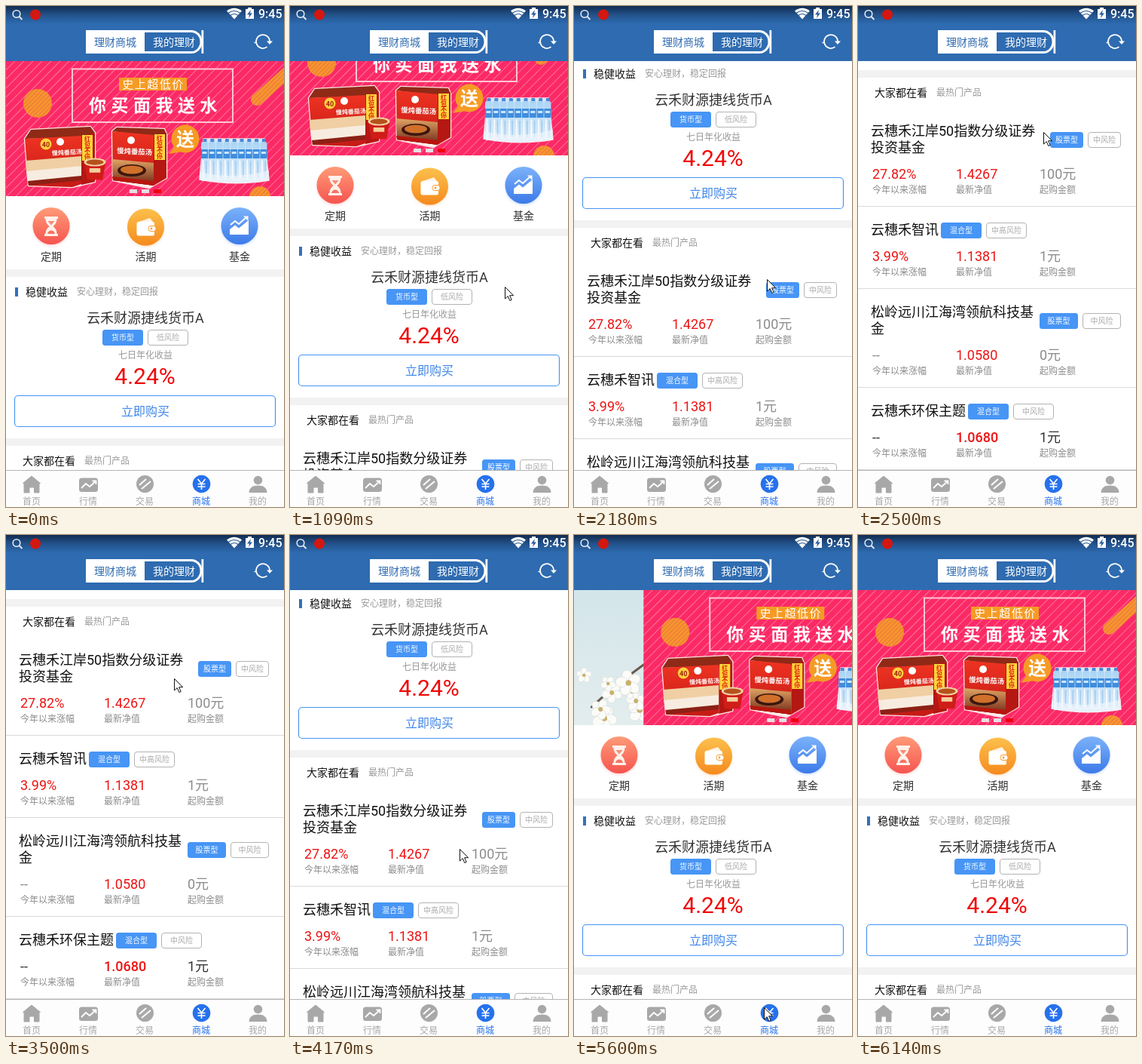
An HTML page that plays this animation: 369 by 664 pixels, repeating every 7.67 s.

```html
<!DOCTYPE html>
<html lang="zh-CN">
<head>
<meta charset="utf-8">
<title>理财商城</title>
<style>
html, body { margin: 0; width: 100%; height: 100%; overflow: hidden; background: #fff; }
svg { display: block; width: 100%; height: 100%; }
text { font-family: Roboto, "Noto Sans CJK SC", "Noto Sans CJK", sans-serif; white-space: pre; }
</style>
</head>
<body>
<svg id="stage" viewBox="0 0 369 664"></svg>
<script>
const LOOP = 7670, FIRST = 174, STEP = 110.2;
const BLUE = '#4795f5', RED = '#ee1414', GREY = '#8c8c8c', NAV = '#a8a8a8';

// drawing helpers
const text = (x, y, s, size, fill, extra = '') =>
  `<text x="${x}" y="${y}" font-size="${size}" fill="${fill}" ${extra}>${s}</text>`;
const mid = (x, y, s, size, fill, extra = '') => text(x, y, s, size, fill, 'text-anchor="middle" ' + extra);
const rect = (x, y, w, h, fill, extra = '') =>
  `<rect x="${x}" y="${y}" width="${w}" height="${h}" fill="${fill}" ${extra}/>`;
const circle = (x, y, r, fill, extra = '') => `<circle cx="${x}" cy="${y}" r="${r}" fill="${fill}" ${extra}/>`;
const path = (d, fill, extra = '') => `<path d="${d}" fill="${fill}" ${extra}/>`;
const line = (d, color, w, extra = '') => path(d, 'none', `stroke="${color}" stroke-width="${w}" ${extra}`);
const group = (attrs, s) => `<g ${attrs}>${s}</g>`;
const repeat = (n, f) => Array.from({ length: n }, (_, i) => f(i)).join('');
const grad = (id, a, b) => `<linearGradient id="${id}" x2="0" y2="1"><stop stop-color="${a}"/>
  <stop offset="1" stop-color="${b}"/></linearGradient>`;

const defs = `<defs>
  ${grad('coral', '#ff9b78', '#f5544f')}${grad('amber', '#fcc04c', '#f58a1e')}${grad('azure', '#7cb2fa', '#3c7ae8')}
  ${grad('carton', '#ee3322', '#c41a15')}${grad('food', '#e0a565', '#6d2413')}
  ${grad('water', '#a9d4f5', '#e2effa')}${grad('sky', '#d3e5ea', '#e3edee')}
  <linearGradient id="status" x2="0" y2="1"><stop stop-color="#122c50"/><stop offset=".5" stop-color="#23538c"/>
    <stop offset="1" stop-color="#2e6bb0"/></linearGradient>
  <pattern id="rain" width="8.5" height="8.5" patternUnits="userSpaceOnUse" patternTransform="rotate(45)">
    ${rect(0, 0, 9, 9, '#fb2a66')}${rect(0, 0, .9, 9, '#ff7a9c')}</pattern>
  <pattern id="peel" width="4" height="4" patternUnits="userSpaceOnUse" patternTransform="rotate(45)">
    ${rect(0, 0, 4, 4, '#f6982c')}${rect(0, 0, 1.2, 4, '#ee7440')}</pattern>
  <clipPath id="view">${rect(0, 73, 369, 542, '#000')}</clipPath>
  <clipPath id="frame">${rect(0, 73, 369, 179, '#000')}</clipPath>
  <filter id="soft" x="-30%" y="-30%" width="160%" height="160%"><feGaussianBlur stdDeviation="2"/></filter>
</defs>`;

function noodleBoxes() {
  const glow = 'stroke="#ffe3e3" stroke-width="2.5" stroke-linejoin="round"';
  const bowl = (x, y, w) =>
    path(`M${x - w} ${y}L${x - w * .7} ${y + w * 1.6}H${x + w * .7}L${x + w} ${y}Z`, '#cf1d18') +
    `<ellipse cx="${x}" cy="${y}" rx="${w}" ry="${w * .38}" fill="#f3d3a4"/>
     <ellipse cx="${x}" cy="${y}" rx="${w * .8}" ry="${w * .25}" fill="#b5521d"/>` +
    rect(x - w * .5, y + w * .55, w, w * .4, '#f5cf9c');
  const strip = (x, y) => rect(x, y, 14, 34, '#ffd53a') +
    repeat(4, i => mid(x + 7, y + 8 + i * 8, '红包不停'[i], 8, '#d21', 'font-weight="700"'));
  const big = path('M25 176L33 164L112 160L118 168V233L88 240L30 238Z', '#fff', glow) +
    path('M25 176L33 164L112 160L118 168L100 174Z', '#8f2a17') +
    path('M25 176L100 172V236L88 240L30 238Z', 'url(#carton)') +
    path('M26 205L100 199V213L27 220Z', '#f0cfa4') + path('M27 219L100 212V226L29 233Z', '#f7ece0') +
    path('M29 232L100 225V231L30 238Z', '#8d2015') +
    path('M100 172L118 168V233L100 237Z', '#b51713') + strip(101, 171) +
    circle(53, 183, 7.5, '#ffd23c') + mid(53, 186.5, '40', 9, '#a32212', 'font-weight="700"') +
    circle(72, 180, 5, '#fff') +
    text(61, 198, '慢炖番茄汤', 8, '#fff', 'font-weight="700" transform="rotate(-3 61 198)"') + bowl(118, 207, 14.5);
  const small = path('M141 166L147 161L210 163L213 170V228L190 241L142 231Z', '#fff', glow) +
    path('M141 166L147 161L210 163L213 170L196 173Z', '#8f2a17') +
    path('M141 166L196 171V238L142 231Z', 'url(#carton)') +
    path('M196 171L213 168V228L196 238Z', '#b51713') + strip(197, 170) +
    circle(166, 178, 5, '#fff') +
    text(147, 195, '慢炖番茄汤', 9.4, '#fff', 'font-weight="700" transform="rotate(3 147 195)"') +
    path('M141 203L196 208V238L142 231Z', 'url(#food)') +
    `<ellipse cx="167" cy="218" rx="19" ry="8" fill="#3a1710"/><ellipse cx="167" cy="217" rx="15" ry="5.5" fill="#d0702a"/>` +
    path('M141 226L196 232V238L142 231Z', '#b8160f');
  return big + small;
}

function waterPack() {
  const bottle = i => {
    const x = 259 + i * 9.8;
    return rect(x + 2.5, 176, 5, 5, '#4a86d6', 'rx="1"') + rect(x, 180, 9, 52, 'url(#water)', 'rx="3"') +
      rect(x, 190, 9, 12, '#3f8ddd') + rect(x + 1.5, 193, 6, 3, '#cde6fb') +
      rect(x + 1.5, 204, 2, 26, '#fff', 'opacity=".8"') + rect(x + 6, 206, 1.5, 22, '#8fbfe9', 'opacity=".7"');
  };
  return path('M262 176H343L349 231Q303 239 257 230Z', '#d5e7f6', 'stroke="#ffe0e8" stroke-width="1.5"') +
    repeat(9, bottle) + path('M257 220Q303 231 349 218V231Q303 239 257 230Z', '#eef5fc', 'opacity=".7"');
}

const pinkBanner = () => rect(0, 73, 369, 179, 'url(#rain)') +
  circle(42, 129, 19, 'url(#peel)') + circle(337, 253, 14, 'url(#peel)') +
  line('M333 124L376 86', 'url(#peel)', 16, 'stroke-linecap="round"') +
  rect(88, 83.5, 213, 70.5, 'none', 'stroke="#ffc4d5" stroke-width="2"') +
  rect(150, 95, 90, 17, '#f59b25') +
  mid(195.5, 109, '史上超低价', 15, '#fff', 'font-weight="500" letter-spacing="1.5"') +
  text(110, 140, '你买面我送水', 23, '#fff', 'font-weight="700" letter-spacing="6.5"') +
  noodleBoxes() + waterPack() +
  path('M224 186L216 196L234 193Z', '#f59b25') + circle(238, 176, 18.5, '#f59b25') +
  mid(238, 185, '送', 24, '#fff', 'font-weight="700"') +
  repeat(3, i => rect(164 + i * 16, 243, 10, 5, i == 2 ? '#f00010' : '#e6dde2'));

function blossomBanner() {
  const blossom = (x, y, r) => group(`transform="translate(${x} ${y})"`,
    repeat(5, i => `<ellipse cy="${-r * .6}" rx="${r * .45}" ry="${r * .55}" fill="#fbfbf8" stroke="#d5dcda"
      stroke-width=".6" transform="rotate(${i * 72 + x})"/>`) + circle(0, 0, r * .25, '#c9b06c'));
  const twig = (d, w) => line(d, '#6b5a4c', w, 'stroke-linecap="round"');
  const wave = i => line(`M66 ${209 + i * 5}q4.7 -6 9.4 0t9.4 0t9.4 0t9.4 0t9.4 0t9.4 0`, '#8cc068', 1.4);
  return rect(0, 73, 369, 179, 'url(#sky)') +
    twig('M369 172Q330 200 300 228', 3) + twig('M345 190Q348 215 369 236', 2) + twig('M0 236Q18 226 36 246', 2) +
    line('M117 208V223H216V100', '#fff', 4) +
    mid(185, 194, '众享·美惠', 35, '#1d2420', 'font-weight="700"') + repeat(3, wave) +
    repeat(9, i => blossom(290 + (i * 37) % 79, 186 + (i * 23) % 58, 9 + i % 3 * 3)) +
    repeat(4, i => blossom(3 + i * 11, 236 + (i * 7) % 12, 8 + i % 2 * 3));
}

function shortcuts() {
  const badge = (x, y, fill, glow, label, glyph) =>
    circle(x, y + 2, 23.5, glow, 'opacity=".35" filter="url(#soft)"') +
    circle(x, y, 24.5, `url(#${fill})`) + glyph + mid(x, 337, label, 14, '#333');
  return badge(60, 291.5, 'coral', '#f5544f', '定期',
      path('M51 279H69V282H67.5Q67.5 288 62.5 292Q67.5 296 67.5 302H69V305H51V302H52.5Q52.5 296 57.5 292Q52.5 288 52.5 282H51Z', '#fff1ea') +
      path('M55.5 285H64.5L60 290.5Z', '#f98c76') + path('M55 302Q56 297.5 60 297.5T65 302Z', '#f77264')) +
    badge(185.5, 293, 'amber', '#f58a1e', '活期',
      path('M176 286L191 281L195 286Z', '#fff', 'opacity=".85"') +
      rect(173.5, 286, 23.5, 18.5, '#fff', 'rx="2.5"') + rect(189, 291.5, 10, 7, '#fff', 'rx="3" stroke="#f79c2c"') +
      circle(193, 295, 1.4, '#f79c2c')) +
    badge(310, 291.5, 'azure', '#3c7ae8', '基金',
      path('M297 303V296L304 290.5L309 294.5L322 284V303Z', '#fff') +
      line('M298 290L304 285L309 289L319 280', '#fff', 2) + path('M315 278.5H321.5V285Z', '#fff'));
}

const pill = (x, y, w, s) => rect(x, y, w, 21, BLUE, 'rx="3.5"') +
  mid(x + w / 2, y + 14.2, s, 10, '#fff', 'font-weight="500"');
const ghost = (x, y, w, s) => rect(x + .5, y + .5, w - 1, 20, '#fff', 'rx="3.5" stroke="#b3b3b3"') +
  mid(x + w / 2, y + 14.2, s, 10, '#aaa');
const gap = y => rect(0, y, 369, 10, '#f2f2f2');

const offer = () => rect(12, 373, 4, 12, '#3470bb') + text(26, 384, '稳健收益', 14, '#111') +
  text(94, 383, '安心理财，稳定回报', 12, '#999') +
  mid(185, 420, '云禾财源捷线货币A', 18, '#333') +
  pill(128, 429, 54, '货币型') + ghost(188, 429, 54, '低风险') +
  mid(185, 467, '七日年化收益', 12, '#999') + mid(184.5, 501, '4.24%', 30, '#f00808') +
  rect(11.5, 516.5, 346, 41, '#fff', `rx="4.5" stroke="${BLUE}" stroke-width="1.2"`) +
  mid(185, 543, '立即购买', 16, '#3f86e8');

const funds = [
  { name: ['云穗禾江岸50指数分级证券', '投资基金'], type: '股票型', risk: '中风险', tag: [255, 44, 305, 44], vals: ['27.82%', '1.4267', '100元'] },
  { name: ['云穗禾智讯'], type: '混合型', risk: '中高风险', tag: [110, 54, 170, 54], vals: ['3.99%', '1.1381', '1元'] },
  { name: ['松岭远川江海湾领航科技基', '金'], type: '股票型', risk: '中风险', tag: [241, 51, 298, 51], vals: ['--', '1.0580', '0元'] },
  { name: ['云穗禾环保主题'], type: '混合型', risk: '中风险', tag: [146, 54, 206, 54], vals: ['--', '1.0680', '1元'], dark: true }
];
const labels = ['今年以来涨幅', '最新净值', '起购金额'];

function fundList() {
  let top = 622;
  return funds.map(f => {
    const extra = (f.name.length - 1) * 22, tagY = top + 22 + extra / 2, [a, aw, b, bw] = f.tag;
    const plain = f.dark ? '#333' : GREY;
    const cells = f.vals.map((v, i) => {
      const x = 19 + i * 111, red = i < 2 && v != '--';
      return text(x, top + 73 + extra, v, 18, red ? RED : plain, f.dark && red ? 'font-weight="500"' : '') +
        text(x, top + 92 + extra, labels[i], 12, GREY);
    }).join('');
    const row = f.name.map((s, i) => text(17, top + 38 + i * 22, s, 18, '#111')).join('') +
      pill(a, tagY, aw, f.type) + ghost(b, tagY, bw, f.risk) + cells;
    top += 109 + extra;
    return row + rect(0, top, 369, 1, '#d9d9d9');
  }).join('');
}

const page = () => group('clip-path="url(#frame)"',
    group('id="blossom"', blossomBanner()) + group('id="pink"', pinkBanner())) +
  shortcuts() + gap(349) + offer() + gap(573) +
  text(22, 608, '大家都在看', 14, '#111') + text(104, 607, '最热门产品', 12, '#999') + fundList();

const header = () => rect(0, 0, 369, 73, '#2e6bb0') + rect(0, 0, 369, 24, 'url(#status)') +
  circle(14, 10.5, 4.8, 'none', 'stroke="#e4ebf3" stroke-width="1.6"') + line('M17.5 14L21.5 18', '#e4ebf3', 1.8) +
  circle(39, 11.5, 7, '#d4170f') +
  path('M293 6.5Q303 -1 313 6.5L303 17.5Z', '#fff') +
  line('M295 9.5Q303 3.5 311 9.5M298 12.5Q303 8.5 308 12.5', '#28598f', 1.1) +
  path('M318 4H321V2H326V4H329V17H318Z', '#fff') + path('M325 5L320 11.5H323L322 16L327 9.5H324Z', '#2a5f9e') +
  text(335, 16, '9:45', 16, '#fff', 'font-weight="500"') +
  rect(106, 32, 78, 31, '#fff') + mid(145, 52.5, '理财商城', 14, '#2e6bb0') +
  line('M184 33.5H246A13 14 0 0 1 246 61.5H184', '#fff', 3) + rect(259.5, 32, 2.7, 31, '#fff') +
  mid(223, 52.5, '我的理财', 14, '#fff', 'font-weight="500"') +
  line('M346.5 54.2A9 9 0 1 1 350 47', '#fff', 1.7) +
  path('M346 46.5H354L350 51Z', '#fff') + line('M329.5 48.5H333', '#fff', 1.5);

function navBar() {
  const icons = path('M34 623L45.5 632.5H44V645H37.5V638H31V645H24V632.5H22.5Z', NAV, `stroke="${NAV}" stroke-linejoin="round"`) +
    rect(97, 625.5, 25, 18.5, NAV, 'rx="3.5"') +
    line('M100 639L106 633L111 637L119 630M114.5 629.5H119.5V634', '#fff', 1.8) +
    circle(184.5, 633.5, 11.5, NAV) + line('M177 635L186 627M180 640L192 630', '#fff', 2) +
    circle(259.5, 633.5, 11.8, '#2671ec') +
    line('M254.5 627L259.5 633L264.5 627M259.5 633V641M254.5 633.5H264.5M254.5 637H264.5', '#fff', 1.6) +
    circle(334.5, 628.5, 5.8, NAV) + path('M322.5 645Q323 635.5 334.5 635.5T346.5 645Z', NAV);
  return rect(0, 615, 369, 49, '#fdfdfd') + rect(0, 615, 369, 1, '#b5b5b5') + icons +
    ['首页', '行情', '交易', '商城', '我的'].map((s, i) => mid(34 + i * 75, 661, s, 12, i == 3 ? '#2671ec' : NAV)).join('');
}

const stage = document.getElementById('stage');
stage.innerHTML = defs + rect(0, 0, 369, 664, '#fff') +
  group('clip-path="url(#view)"', group('id="page"', page())) + header() + navBar() +
  group('id="cursor"', path('M.5 .5V16L4.2 12.6L6.8 18.5L9.2 17.4L6.6 11.7H11.6Z', '#fff', 'stroke="#111" stroke-width="1"'));
const [pageEl, pinkEl, blossomEl, cursorEl] =
  ['page', 'pink', 'blossom', 'cursor'].map(id => document.getElementById(id));

// step, pointer x, pointer y, scroll
const keys = [
  [0, 280, 517, 0], [6, 286, 433, 0], [7, 286, 405, 18], [8, 285, 372, 54], [10, 280, 275, 150],
  [11, 277, 280, 156], [13, 269, 377, 156], [15, 262, 492, 156], [16, 262, 492, 156], [21, 246, 167, 488],
  [22, 247, 215, 488], [24, 245, 463, 488], [25, 240, 486, 488], [26, 240, 486, 488], [30, 223, 190, 488],
  [32, 223, 190, 488], [33, 223, 232, 470], [36, 225, 416, 288], [39, 232, 589, 115], [40, 234, 597, 115],
  [44, 245, 336, 115], [45, 245, 350, 105], [47, 250, 611, 0], [54, 256, 665, 0]
];
const SWAP = 15, RETURN = 48, LAST = 54, WIDTH = 369;

function pose(k) {
  if (k <= 0) return keys[0];
  const i = keys.findIndex(p => p[0] >= k);
  if (i < 0) return keys[keys.length - 1];
  const a = keys[i - 1], b = keys[i], u = (k - a[0]) / (b[0] - a[0]);
  return a.map((v, j) => Math.round(v + (b[j] - v) * u));
}

const move = (el, x, y) => el.setAttribute('transform', `translate(${x} ${y})`);
const show = (el, on) => el.setAttribute('visibility', on ? 'visible' : 'hidden');

function render(t) {
  // the screen refreshes in even, visible steps
  const k = Math.floor((t - FIRST) / STEP);
  const [, x, y, scroll] = pose(k);
  const left = Math.max(0, 1 - (k - RETURN + 1) / 4);
  const slide = k < SWAP ? 0 : k < RETURN ? 1 : left * left;
  move(pageEl, 0, -scroll);
  move(pinkEl, slide * WIDTH, 0);
  move(blossomEl, (slide - 1) * WIDTH, 0);
  show(pinkEl, slide < 1);
  show(blossomEl, slide > 0);
  move(cursorEl, x, y);
  show(cursorEl, k >= 0 && k < LAST);
}

const start = performance.now();
function tick() {
  render((performance.now() - start) % LOOP);
  requestAnimationFrame(tick);
}
tick();
</script>
</body>
</html>
```
